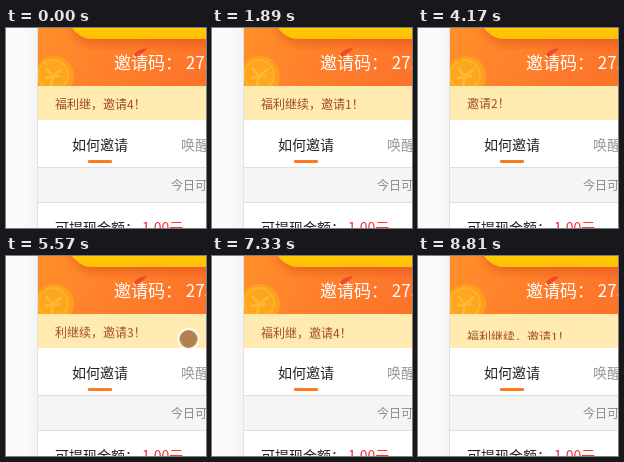
These frames come from a looping animation (200 px wide and 200 px high, 8.91 s). An HTML page:

```html
<!DOCTYPE html>
<html lang="zh-CN">
<head>
<meta charset="utf-8">
<title>邀请</title>
<style>
html, body { margin: 0; width: 100%; height: 100%; overflow: hidden; background: #fff; }
body { position: relative; font-family: "Noto Sans CJK SC", "Noto Sans CJK", "Noto Sans", sans-serif; }
svg { position: absolute; left: 0; top: 0; width: 200px; height: 200px; }
text { font-family: inherit; font-size: 14px; white-space: pre; }
.ticker { position: absolute; left: 49px; top: 70px; width: 110px; height: 14px; overflow: hidden; }
#line {
  margin-top: -4px; font-size: 12px; line-height: 18px; color: #a04a20;
  white-space: nowrap; will-change: transform;
}
.pointer {
  position: absolute; left: -11px; top: -11px; width: 18px; height: 18px;
  border: 2px solid #fffaf0; border-radius: 50%; background: #b0824f;
  animation: wander 8910ms linear infinite;
}
@keyframes wander {
  0%, 59.4% { transform: translate(214px, 81px); opacity: 1; }
  62.51% { transform: translate(182.5px, 83px); }
  67.4% { transform: translate(163px, 72px); }
  72.8% { transform: translate(162px, 76px); }
  76.3% { transform: translate(161px, 78px); opacity: 1; }
  76.31%, 100% { transform: translate(214px, 81px); opacity: 0; }
}
</style>
</head>
<body>
<svg viewBox="0 0 200 200">
  <defs>
    <linearGradient id="banner" x2="1" y2=".2">
      <stop offset="0" stop-color="#ff8f2a"/>
      <stop offset=".45" stop-color="#ff822b"/>
      <stop offset="1" stop-color="#fd752b"/>
    </linearGradient>
    <linearGradient id="gold" x2="0" y2="1">
      <stop offset=".6" stop-color="#ffd000"/>
      <stop offset="1" stop-color="#ffc107"/>
    </linearGradient>
    <linearGradient id="side">
      <stop offset=".6" stop-color="#fafafa"/>
      <stop offset="1" stop-color="#f3f3f3"/>
    </linearGradient>
    <linearGradient id="amount">
      <stop offset="0" stop-color="#ee1c50"/>
      <stop offset="1" stop-color="#fc3f22"/>
    </linearGradient>
    <filter id="soft"><feGaussianBlur stdDeviation="4"/></filter>
    <clipPath id="top"><path d="M32 0H200V58H32z"/></clipPath>
  </defs>

  <path fill="url(#side)" d="M0 0H32V200H0z"/>
  <path fill="#e2e2e2" d="M31 0h1v200h-1z"/>

  <g clip-path="url(#top)">
    <path fill="url(#banner)" d="M32 0H200V58H32z"/>
    <circle cx="48" cy="48" r="20" fill="#ff9f22"/>
    <circle cx="47" cy="47" r="15" fill="#ffa61f" stroke="#ffb326" stroke-width="2"/>
    <path d="M40 40l7 8 9-7M47 47l-2 11M39 50l15-2" fill="none" stroke="#ffb938" stroke-width="2.5"/>
    <rect x="64" y="-32" width="200" height="49" rx="24.5" fill="#dc5012" opacity=".5" filter="url(#soft)"/>
    <rect x="62" y="-38" width="200" height="49" rx="24.5" fill="url(#gold)"/>
    <path d="M127 29q2-8 14-9-3 5-7 6-1 3-7 3z" fill="#ee4a2c"/>
    <text x="108" y="41" fill="#fff" style="font-size:17px">邀请码： 275</text>
  </g>

  <path fill="#ffebb0" d="M32 58H200V92H32z"/>
  <path fill="#f5f5f5" d="M32 139H200V175H32z"/>
  <path fill="#dedede" d="M32 139h168v1H32zM32 174h168v1H32z"/>
  <rect x="82" y="132" width="24" height="3" rx="1" fill="#ff7a1c"/>

  <text x="66" y="122" fill="#222">如何邀请</text>
  <text x="175" y="122" fill="#999">唤醒</text>
  <text x="165" y="162" fill="#888" style="font-size:12px">今日可</text>
  <text x="49" y="205" fill="#222">可提现金额：</text>
  <text x="136" y="205" fill="url(#amount)">1.00元</text>
</svg>
<div class="ticker"><div id="line"></div></div>
<div class="pointer"></div>

<script>
const LOOP = 8910, CYCLE = 1870, RISE = 1590, LEAD = 1085, SWAP = 130, TRAVEL = 14;
const messages = ['福利继，邀请4！', '福利继续，邀请1！', '邀请2！', '利继续，邀请3！'];
const line = document.getElementById('line');

// CSS "ease": cubic-bezier(.25, .1, .25, 1)
const bezier = (a, b, s) => 3 * a * s * (1 - s) ** 2 + 3 * b * s * s * (1 - s) + s ** 3;
function ease(x) {
  let lo = 0, hi = 1;
  for (let i = 0; i < 24; i++) {
    const mid = (lo + hi) / 2;
    if (bezier(.25, .25, mid) < x) lo = mid; else hi = mid;
  }
  return bezier(.1, 1, lo);
}

// Slow rise into place, then a quick exit upwards
function offset(phase) {
  return phase < RISE
    ? TRAVEL * (1 - ease(phase / RISE))
    : -TRAVEL * ease((phase - RISE) / (CYCLE - RISE));
}

// The message changes shortly after each new rise has begun
function draw(now) {
  const t = now % LOOP + LEAD;
  const message = messages[Math.floor((t - SWAP) / CYCLE) % messages.length];
  if (line.textContent !== message) line.textContent = message;
  line.style.transform = `translateY(${offset(t % CYCLE).toFixed(3)}px)`;
}

const start = performance.now();
function tick() {
  draw(performance.now() - start);
  requestAnimationFrame(tick);
}
tick();
</script>
</body>
</html>
```
